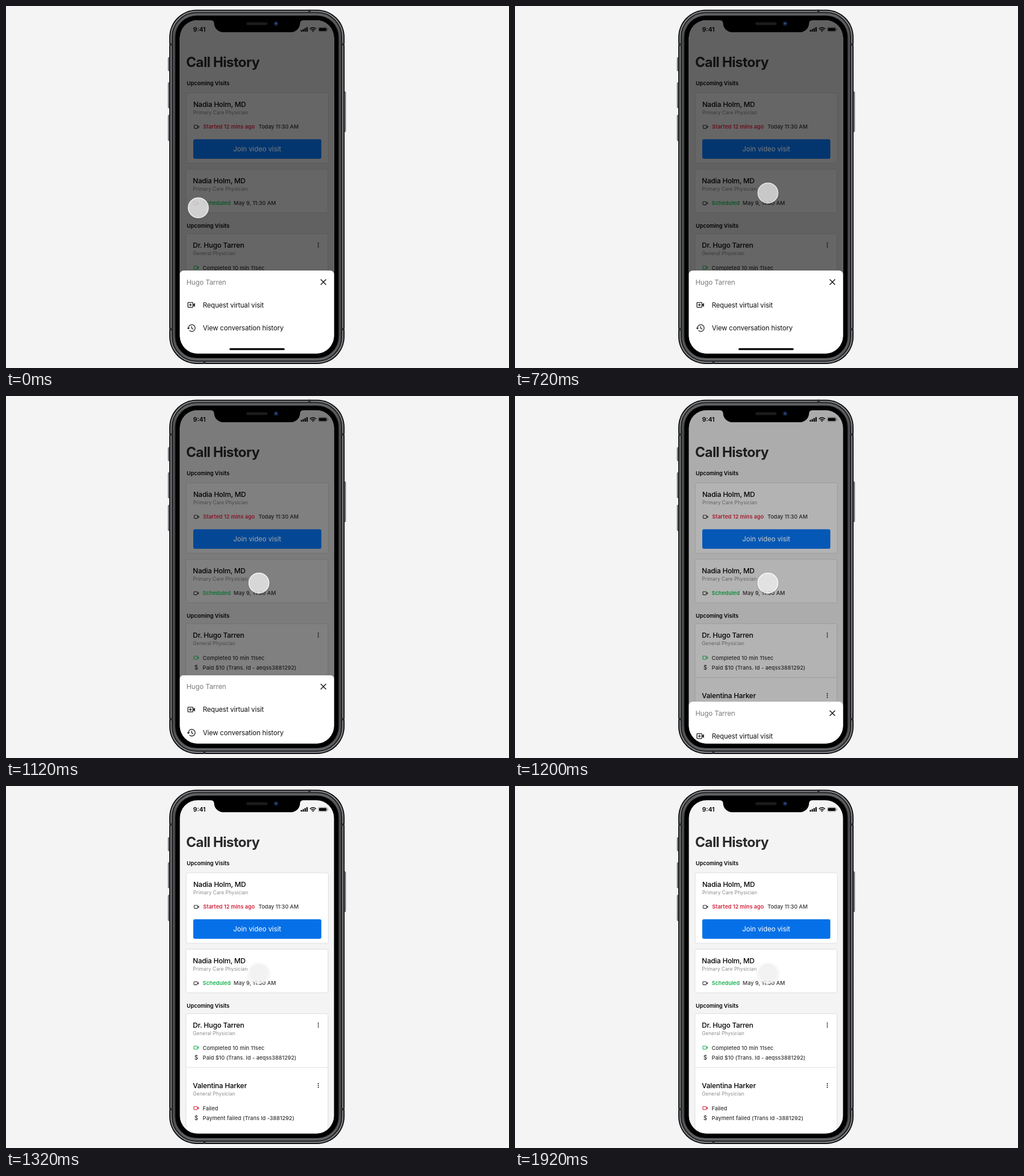
Write an HTML page that moves like this. It is 881 px wide and 635 px high and loops after 1.96 s.

```html
<!DOCTYPE html>
<html lang="en">
<head>
<meta charset="utf-8">
<title>Call History</title>
<style>
  html, body { margin: 0; width: 100%; height: 100%; overflow: hidden; background: #f4f4f4; }
  svg { display: block; width: 881px; height: 635px; }
  text { font-family: Inter, Roboto, sans-serif; fill: #000; white-space: pre; }

  .clock { font-size: 10.9px; font-weight: 600; }
  .title { font-size: 24px; font-weight: 700; letter-spacing: -.64px; fill: #2b2b2d; }
  .head  { font-size: 9.45px; font-weight: 600; letter-spacing: .03px; }
  .name  { font-size: 12.25px; font-weight: 500; letter-spacing: -.16px; }
  .role  { font-size: 8.64px; letter-spacing: .07px; fill: #8b8b8b; }
  .info  { font-size: 9.4px; font-weight: 500; letter-spacing: .08px; fill: #333; }
  .state { font-size: 9.4px; font-weight: 600; letter-spacing: .08px; }
  .join  { font-size: 12px; letter-spacing: -.05px; fill: #fff; text-anchor: middle; }
  .who   { font-size: 12px; letter-spacing: -.1px; fill: #7b7b7b; }
  .item  { font-size: 11.8px; letter-spacing: -.1px; fill: #111; }

  .red { fill: #d0213a; color: #d0213a; }
  .green { fill: #12b04c; color: #12b04c; }
  .dark { color: #333; }
  .card { fill: #fff; filter: drop-shadow(0 .8px 1.2px rgba(0,0,0,.2)); }

  .dim, .vivid, .sheet { animation: 1960ms linear infinite; }
  .dim { animation-name: undim; }
  .vivid { animation-name: brighten; }
  .sheet { animation-name: slide; }
  .touch { animation: move 1960ms infinite; }
  .disc { animation: press 1960ms linear infinite; }

  @keyframes undim {
    0%, 57.13% { opacity: .6; }
    57.14% { opacity: .5; }
    67.34%, 100% { opacity: 0; }
  }
  @keyframes brighten {
    0%, 57.13% { filter: brightness(.48); }
    57.14% { filter: brightness(.64); }
    67.34%, 100% { filter: brightness(1); }
  }
  @keyframes slide {
    0%, 57.13% { transform: translateY(0); }
    57.14% { transform: translateY(25px); }
    61.22% { transform: translateY(71.5px); }
    67.34%, 100% { transform: translateY(148px); }
  }
  @keyframes move {
    0% { transform: translate(336.5px, 354px); animation-timing-function: cubic-bezier(.35,.3,.5,1); }
    18.36%, 100% { transform: translate(443px, 328px); }
  }
  @keyframes press {
    0%, 35.2% { opacity: 1; }
    42.85%, 57.13% { opacity: .6; }
    57.14%, 100% { opacity: 1; }
  }
</style>
</head>
<body>
<svg viewBox="0 0 881 635">
  <defs>
    <clipPath id="screen"><rect x="304.5" y="25" width="270" height="584.5" rx="31"/></clipPath>
    <linearGradient id="rim" x2="0" y2="1">
      <stop offset="0" stop-color="#626365"/><stop offset=".08" stop-color="#4a4b4d"/>
      <stop offset=".92" stop-color="#4a4b4d"/><stop offset="1" stop-color="#626365"/>
    </linearGradient>
    <g id="cam">
      <rect x=".6" y=".6" width="6" height="5.4" rx=".8" fill="none" stroke="currentColor" stroke-width="1.1"/>
      <path d="M6.6 3.3 9.2 1.1v4.4z" fill="currentColor"/>
    </g>
    <g id="more" fill="#222">
      <circle cy="-3.3" r="1.05"/><circle r="1.05"/><circle cy="3.3" r="1.05"/>
    </g>
  </defs>

  <rect width="881" height="635" fill="#f4f4f4"/>

  <!-- phone body -->
  <g fill="#88898b" stroke="#2a2a2b" stroke-width=".8">
    <rect x="284.2" y="90.4" width="4" height="23.4" rx="1"/>
    <rect x="284.2" y="134.4" width="4" height="44.4" rx="1"/>
    <rect x="284.2" y="191.4" width="4" height="44.8" rx="1"/>
    <rect x="590.800" y="150.400" width="4" height="70.200" rx="1"/>
  </g>
  <rect x="286" y="6.500" width="307" height="621.500" rx="48" fill="#0d0e0f"/>
  <rect x="289" y="9.500" width="301" height="615.500" rx="45" fill="#1f2021" stroke="#85878a" stroke-width="2"/>
  <rect x="294" y="14.500" width="291" height="605.500" rx="40" fill="none" stroke="url(#rim)" stroke-width="3.800"/>
  <rect x="297" y="17.500" width="285" height="599.500" rx="37" fill="#000"/>
  <g fill="#2b2c2e">
    <rect x="286" y="65.500" width="5.500" height="4"/><rect x="587.500" y="65.500" width="5.500" height="4"/>
    <rect x="286" y="565" width="5.500" height="4"/><rect x="587.500" y="565" width="5.500" height="4"/>
    <rect x="529.500" y="6.500" width="4" height="5"/><rect x="345.500" y="623" width="4" height="5"/>
  </g>

  <g clip-path="url(#screen)">
    <rect x="304" y="24" width="271" height="587" fill="#f4f4f4"/>

    <!-- status bar -->
    <text class="clock" x="327.700" y="45">9:41</text>
    <rect x="516.300" y="42" width="2.200" height="3" rx=".6"/>
    <rect x="519.600" y="40.500" width="2.200" height="4.500" rx=".6"/>
    <rect x="522.900" y="38.700" width="2.200" height="6.300" rx=".6"/>
    <rect x="526.200" y="37" width="2.200" height="8" rx=".6"/>
    <g fill="none" stroke="#000" stroke-width="1.500">
      <path d="M532.400 40.300a7.400 7.400 0 0 1 10.600 0M534.300 42.300a4.800 4.800 0 0 1 6.800 0"/>
    </g>
    <path d="M537.700 45.300l-1.700-1.800a2.400 2.400 0 0 1 3.400 0z"/>
    <rect x="547" y="37.300" width="15.600" height="7.600" rx="2.200" fill="none" stroke="#000" stroke-opacity=".4" stroke-width=".7"/>
    <rect x="548.200" y="38.500" width="13.200" height="5.200" rx="1.200"/>
    <rect x="563.300" y="39.800" width="1" height="2.600" rx=".5" fill-opacity=".45"/>

    <!-- visits -->
    <text class="title" x="315.500" y="107">Call History</text>
    <text class="head" x="316.500" y="139.400">Upcoming Visits</text>

    <rect class="card" x="316.300" y="153" width="247.700" height="122.300" rx="2.500"/>
    <text class="name" x="328" y="176.600">Nadia Holm, MD</text>
    <text class="role" x="328" y="190.300">Primary Care Physician</text>
    <use class="dark" href="#cam" x="329" y="208.600"/>
    <text class="info" x="442.300" y="215.400" style="letter-spacing:0">Today 11:30 AM</text>

    <rect class="card" x="315.800" y="287" width="247.700" height="75.300" rx="2.500"/>
    <text class="name" x="327.300" y="310.600">Nadia Holm, MD</text>
    <text class="role" x="327.300" y="324.200">Primary Care Physician</text>
    <use class="dark" href="#cam" x="328.500" y="342.600"/>
    <text class="info" x="398.800" y="349.400">May 9, 11:30 AM</text>

    <text class="head" x="316.500" y="389.400">Upcoming Visits</text>
    <rect class="card" x="315.800" y="400" width="247.700" height="230" rx="2.500"/>
    <text class="name" x="327.300" y="423.600">Dr. Hugo Tarren</text>
    <text class="role" x="327.300" y="437.400">General Physician</text>
    <use href="#more" x="547" y="419.300"/>
    <text class="info" x="344.600" y="462.500">Completed 10 min 11sec</text>
    <text class="info" x="330" y="480" style="font-size:10px">$</text>
    <text class="info" x="344.600" y="479.900">Paid $10 (Trans. Id - aeqss3881292)</text>
    <rect x="315.800" y="493.300" width="247.700" height="1" fill="#dedede"/>

    <text class="name" x="327.300" y="529.600">Valentina Harker</text>
    <text class="role" x="327.300" y="543.400">General Physician</text>
    <use href="#more" x="547" y="525.300"/>
    <text class="info" x="344.600" y="568.500">Failed</text>
    <text class="info" x="330" y="586" style="font-size:10px">$</text>
    <text class="info" x="344.600" y="585.900">Payment failed (Trans Id -3881292)</text>

    <rect class="dim" x="304" y="24" width="271" height="587"/>

    <!-- coloured parts darken less than the rest -->
    <g class="vivid">
      <text class="state red" x="345.300" y="215.400">Started 12 mins ago</text>
      <rect x="328" y="233.800" width="224.300" height="34.200" rx="3" fill="#0670e8"/>
      <text class="join" x="440" y="255.300">Join video visit</text>
      <text class="state green" x="344.600" y="349.400">Scheduled</text>
      <use class="green" href="#cam" x="328.500" y="455.700"/>
      <use class="red" href="#cam" x="328.500" y="561.700"/>
    </g>

    <!-- action sheet -->
    <g class="sheet">
      <path d="M304 620V471.500a7.500 7.500 0 0 1 7.500-7.500h256a7.500 7.500 0 0 1 7.500 7.500V620z" fill="#fff"/>
      <text class="who" x="316" y="488.500">Hugo Tarren</text>
      <path d="M551.200 479.500l9.400 9.400m0-9.400l-9.400 9.400" stroke="#111" stroke-width="1.400"/>
      <g fill="none" stroke="#222" stroke-width="1.300">
        <rect x="318.600" y="520.200" width="8.800" height="8.400" rx=".8"/>
        <path d="M323 522v4.800M320.600 524.400h4.800"/>
        <path d="M327.400 524.400l3.200-2.900v5.800z" fill="#222" stroke-width=".8"/>
        <path d="M319.500 565a5.900 5.900 0 1 1 1.900 4.300"/>
        <path d="M325.300 561.700v3.700l2.700 1.600"/>
      </g>
      <path d="M316.900 564.500h5.200l-2.600 2.800z" fill="#222"/>
      <text class="item" x="344.700" y="528.800">Request virtual visit</text>
      <text class="item" x="344.700" y="569.200">View conversation history</text>
      <rect x="391.300" y="600.200" width="96.800" height="3.400" rx="1.700"/>
    </g>
  </g>

  <!-- notch -->
  <path d="M358 23v2q6 0 6.500 5a16 16 0 0 0 16 16h118.500a16 16 0 0 0 16-16q.5-5 6.500-5v-2z"/>
  <rect x="421" y="28.500" width="37" height="5" rx="2.500" fill="#1b1b1c"/>
  <circle cx="473" cy="31" r="4.200" fill="#10192b"/>
  <circle cx="473" cy="30.700" r="1.900" fill="#28518f"/>

  <g class="touch">
    <g class="disc">
      <circle r="17.600" fill="#f8f8f8" fill-opacity=".76" stroke="#fff" stroke-opacity=".85" stroke-width="1.500"
        style="filter:drop-shadow(0 1.500px 1.500px rgba(0,0,0,.16))"/>
    </g>
  </g>
</svg>
</body>
</html>
```
